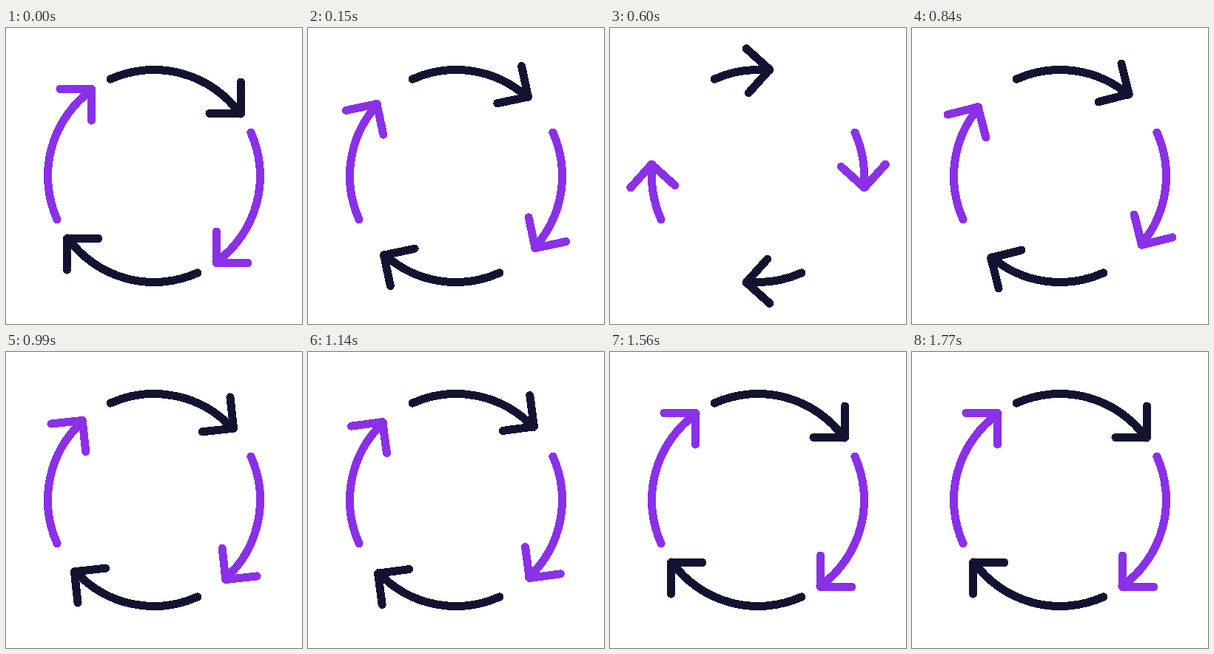
Write an HTML page that moves like this. It is 400x400 px and loops after 1.83 s.

```html
<!DOCTYPE html>
<html lang="en">
<head>
<meta charset="utf-8">
<title>Cycle arrows</title>
<style>
  html, body { margin: 0; width: 100%; height: 100%; overflow: hidden; background: #fff; }
  svg { display: block; width: 100%; height: 100%; shape-rendering: crispEdges; }
  path { fill: none; stroke-width: 11; stroke-linecap: round; stroke-linejoin: round; }
  .dark { stroke: #121331; }
  .violet { stroke: #8930e8; }
</style>
</head>
<body>
<svg viewBox="-200 -200 400 400">
  <defs>
    <g id="arrow">
      <path id="shaft"/>
      <path id="head" d="M117.5 -127V-84.5H75"/>
    </g>
  </defs>
  <use href="#arrow" class="dark"/>
  <use href="#arrow" class="violet" transform="rotate(90)"/>
  <use href="#arrow" class="dark" transform="rotate(180)"/>
  <use href="#arrow" class="violet" transform="rotate(270)"/>
</svg>
<script>
  const LOOP = 1830, STEP = 30, LAST = 1770;
  const RADIUS = 143.5, TAIL = -24.2, TIP = 54.2;
  const PULL = 52.6, TURN = 474, LAND = 902, HOP = 1260, REST = 1440;
  const shaft = document.getElementById('shaft');
  const head = document.getElementById('head');

  // Angles are in degrees, clockwise from the top.
  function point(deg) {
    const a = deg * Math.PI / 180;
    return `${(RADIUS * Math.sin(a)).toFixed(3)} ${(-RADIUS * Math.cos(a)).toFixed(3)}`;
  }

  const hop = (t, start, end, height) => {
    const x = (2 * t - start - end) / (end - start);
    return height * (1 - x * x);
  };

  // How far the arrow is drawn back: eased pull, free fall, two small bounces.
  function pullback(t) {
    if (t < TURN) return PULL * (1 - Math.cos(Math.PI * t / TURN)) / 2;
    if (t < LAND) return PULL * (1 - ((t - TURN) / (LAND - TURN)) ** 2);
    if (t < HOP) return hop(t, LAND, HOP, 8.45);
    if (t < REST) return hop(t, HOP, REST, 1.15);
    return 0;
  }

  const origin = performance.now();

  function draw(now) {
    const t = Math.max(0, now - origin) % LOOP;
    const back = pullback(Math.min(Math.floor(t / STEP) * STEP, LAST));
    shaft.setAttribute('d', `M${point(TAIL)}A${RADIUS} ${RADIUS} 0 0 1 ${point(TIP - back)}`);
    head.setAttribute('transform', `rotate(${-back})`);
    requestAnimationFrame(draw);
  }
  draw(origin);
</script>
</body>
</html>
```
